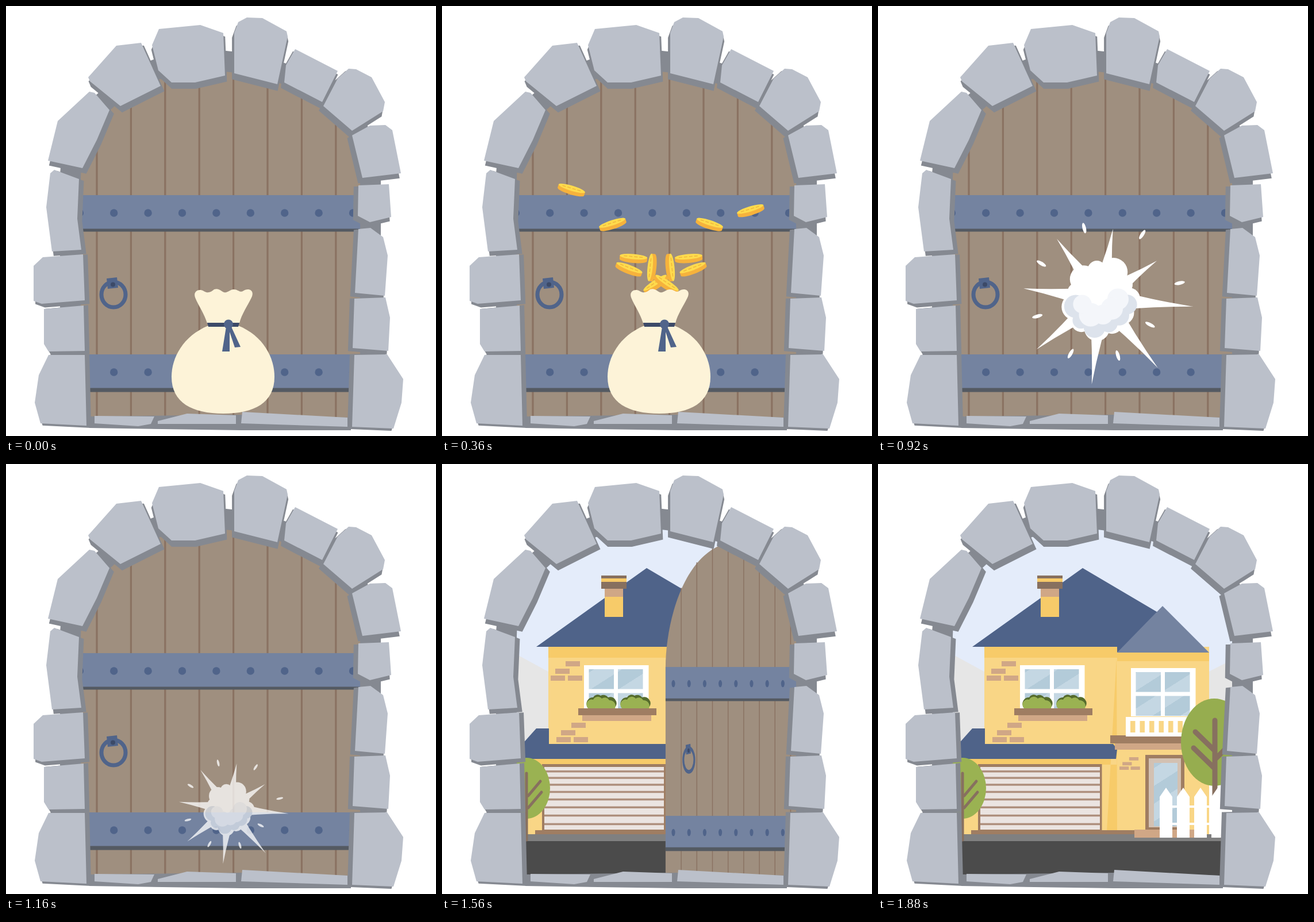
An HTML page that plays this animation: 748x748 px, repeating every 1.92 s.

```html
<!DOCTYPE html>
<html>
<head>
<meta charset="utf-8">
<style>
html, body { margin: 0; width: 100%; height: 100%; overflow: hidden; background: #fff; }
svg { display: block; width: 100vw; height: 100vh; }
</style>
</head>
<body>
<svg viewBox="0 0 748 748">
<defs>
  <path id="arch" d="M112 725V300C112 170 250 85 372 95S632 160 634 300V725"/>
  <clipPath id="gate"><use href="#arch"/></clipPath>
  <g id="stones">
    <path d="M74 607H137L140 730 60 726 50 690 57 642Z
      M66 527L135 521 137 600 74 601 66 588Z
      M48 452L64 437 134 432 137 512 62 518 48 513Z
      M77 291L84 285 127 301 124 370 131 424 80 427 70 350Z
      M73 269L90 200 145 149 154 151 180 181 158 233 133 282Z
      M606 509L660 507 668 542 665 600 603 595Z
      M606 607L663 606 691 649 688 690 674 735 602 732Z"/>
    <path d="M143 124L192 69 235 64 269 139 199 174 146 131Z
      M254 68L266 40 338 33 378 47 381 121 329 133H288L265 112Z
      M397 47L404 28 419 20 446 21 488 44 490 53 472 136 397 117Z
      M487 103L503 75 577 113 550 167 484 133Z
      M596 109L609 110 636 124 659 167 656 183 602 217 552 174 577 126Z
      M602 225L633 208 660 207 672 216 687 291 620 299Z
      M613 312L666 310 670 367 633 376 612 365Z
      M613 388L634 386 656 402 664 434 659 504 607 499Z"/>
  </g>
  <linearGradient id="glass" gradientUnits="userSpaceOnUse" x2="28" y2="44" spreadMethod="repeat">
    <stop offset=".5" stop-color="#b3cbd9"/><stop offset=".5" stop-color="#c4d7e3"/>
  </linearGradient>
  <path id="bricks" fill="#d0a786" d="M26 0h25v9h-25zM8 13h25v9h-25zM0 25h25v9h-25zM30 25h25v9h-25z"/>
  <g id="bush">
    <path d="M0 24A11 11 0 0 1 9 6A9 9 0 0 1 22 3A10 10 0 0 1 35 6A11 11 0 0 1 48 22Z" fill="#556b2c"/>
    <path d="M0 25A9 9 0 0 1 9 10A9 9 0 0 1 24 8A9 9 0 0 1 37 11A10 10 0 0 1 47 25Z" fill="#9ab252"/>
  </g>
  <g id="coin">
    <path d="M-24 -3v6a24 5 0 0 0 48 0v-6z" fill="#f6b23c"/>
    <ellipse cy="-3" rx="24" ry="4.5" fill="#ffdb4d"/>
    <path d="M-17 -3h34" stroke="#f0b93c" stroke-width="1.6" stroke-dasharray="6 3"/>
  </g>
</defs>

<g clip-path="url(#gate)">
  <g id="house">
    <path d="M100 80H640V520H100Z" fill="#e4ecfa"/>
    <path d="M100 315L190 364V520H100ZM646 325L570 364V520H646Z" fill="#e6e6e6"/>
    <path d="M185 318H576V645H148V513H185Z" fill="#f9d686"/>
    <path d="M185 318H416V328H576V343H416V337H185ZM148 513H416V523H148ZM415 337L398 640H416Z" fill="#f7cb69"/>
    <path d="M164 318L356 181 495 263 416 328V318ZM130 498L164 460H186V487H409L416 496 414 513H130Z" fill="#4f6389"/>
    <path d="M416 328L495 247 576 328Z" fill="#7483a0"/>
    <path d="M277 194H321V217H277Z" fill="#87705f"/>
    <path d="M277 199H321V205H277ZM283 231H315V266H283Z" fill="#f7cb69"/>
    <path d="M283 217H315V231H283ZM244 437H364V447H244ZM412 486H528V497H412Z" fill="#d0a786"/>
    <use href="#bricks" x="189" y="343"/>
    <use href="#bricks" x="199" y="450"/>
    <use href="#bricks" transform="translate(420 510)scale(.65)"/>
  </g>
  <g id="door"><path d="M98.600 780V330C98.600 250 165 105 366 95C568 105 633 250 633 330V780Z" fill="#9f8f7f"/></g>
</g>

<use href="#arch" fill="none" stroke="#858991" stroke-width="36"/>
<path d="M145 714L410 711 600 716V738H410L145 734Z" fill="#858991"/>
<use href="#stones" fill="#858991" stroke="#858991" stroke-width="7" transform="translate(372 602)scale(.98 .988)translate(-372 -600)"/>
<g fill="#bbc0ca">
  <use href="#stones"/>
  <path d="M154 713L258 714 252 727 230 731 154 726ZM264 722L315 709 400 712V727H264ZM411 706L594 716V732L409 726Z"/>
</g>

<g id="coins"></g>
<g id="bag">
  <path d="M352 556C308 574 288 612 288 645C288 690 324 709 378 709S467 690 467 645C467 612 448 574 404 556Z" fill="#fdf3d8"/>
  <path d="M350 552C345 535 334 520 329 507C325 496 336 491 344 496S357 497 362 493C370 490 374 496 379 498S390 493 396 493C404 493 406 499 412 496C420 490 432 493 428 505C422 519 410 535 406 552Z" fill="#fdf3d8"/>
  <path d="M350 551H406L404 558H352Z" fill="#3c4a68"/>
  <path d="M383 558L376 601H389V558ZM386 558L398 594 408 593 391 556Z" fill="#50648a"/>
  <circle cx="387" cy="553.500" r="8" fill="#50648a"/>
</g>
<g id="puff" fill="#fff"></g>
</svg>

<script>
const $ = id => document.getElementById(id);
const house = $('house'), door = $('door'), puff = $('puff'), bag = $('bag');
const add = (parent, tag, attrs) => {
  const el = document.createElementNS('http://www.w3.org/2000/svg', tag);
  for (const k in attrs) el.setAttribute(k, attrs[k]);
  parent.appendChild(el);
  return el;
};
const rect = (parent, x, y, width, height, fill) => add(parent, 'rect', { x, y, width, height, fill });
const circle = (parent, cx, cy, r, fill) => add(parent, 'circle', { cx, cy, r, fill });
const path = (parent, d, attrs) => add(parent, 'path', { d, ...attrs });
const clamp = (v, a = 0, b = 1) => Math.min(b, Math.max(a, v));

// Windows, sill, balcony and garage
const wood = '#9f7d62';
function pane4(x, y) {
  rect(house, x, y, 112.5, 84, '#fff');
  for (let i = 0; i < 4; i++)
    rect(house, x + 8.5 + i % 2 * 50.5, y + 7 + (i >> 1) * 41.5, 43.5, 34.5, 'url(#glass)');
}
pane4(247, 350);
pane4(440, 355);
for (const x of [254, 313]) add(house, 'use', { href: '#bush', x, y: 400 });
rect(house, 237, 425, 136, 12, wood);
rect(house, 404, 472, 136, 14, wood);
for (const y of [440, 467]) rect(house, 431, y, 119, 7, '#fff');
for (let x = 431; x < 548; x += 16.5) rect(house, x, 442, 8, 30, '#fff');

rect(house, 162, 637, 284, 8, wood);
rect(house, 174, 522, 215.5, 118, wood);
rect(house, 178, 527, 208, 109, '#ebe4e1');
for (let i = 0; i < 8; i++) rect(house, 178, 533 + 11 * i + .3 * i * i, 208, 3.5, '#ae8f7d');

// Front door and street
rect(house, 465, 506, 68, 134, wood);
rect(house, 471, 512, 56, 120, '#d3c1b2');
rect(house, 480, 520, 41, 110, 'url(#glass)');
rect(house, 100, 644, 540, 13, '#808080');
rect(house, 100, 656, 540, 80, '#4b4b4b');
rect(house, 446, 636, 104, 14, '#d0a786');

function tree(cx, cy, rx, ry, fill, width, branches) {
  add(house, 'ellipse', { cx, cy, rx, ry, fill });
  path(house, branches, { fill: 'none', stroke: '#87705f', 'stroke-linecap': 'round', 'stroke-width': width });
}
tree(585, 484, 58, 76, '#96ad4f', 9, 'M586 446V645M552 466L586 499M549 494L586 530M586 514L612 488');
tree(147, 564, 41, 53, '#9ab252', 5, 'M147 538V654M150 577L171 552M150 598L173 571');
for (const y of [594, 624]) rect(house, 490, y, 116, 4, '#fff');
for (let x = 490; x < 600; x += 30) path(house, `M${x} 650v-71l11 -16 11 16v71z`, { fill: '#fff' });

// Door planks, straps, studs and ring
const left = 98.6, plank = 59.4;
for (let i = 1; i < 9; i++) {
  const x = left + i * plank, off = (x - 366) / 268;
  rect(door, x - 1.6, 330 - 235 * Math.sqrt(1 - off * off), 3.2, 700, '#8a7262');
}
for (const [y, shade] of [[329, 5], [606, 7]]) {
  rect(door, left, y, 535, 59, '#7483a0');
  rect(door, left, y + 58.5, 535, shade, '#545a62');
  for (let i = .5; i < 9; i++) circle(door, left + i * plank, y + 31, 6.7, '#50648a');
}
add(door, 'ellipse', { cx: 187, cy: 502, rx: 21, ry: 22, fill: 'none', stroke: '#50648a', 'stroke-width': 7 });
path(door, 'M175 474L193 472 195 490 177 492Z', { fill: '#50648a' });
circle(door, 186, 484.5, 4, '#3c4a68');

// Mirrored coin pairs in two waves; each coin accelerates into the bag.
// Pair: offset from the mouth at 360 ms, tilt, how much lower the right coin is.
const mouth = { x: 381, y: 512 }, flight = 250, coins = [];
const pairs = [[156, -192, 17, 36], [84, -132, -18, 0], [48, -73, 5, 0], [56, -54, 21, 0], [16, -57, -84, 0], [9, -28, -34, 0]];
for (const wave of [0, 200])
  for (const [x, y, tilt, drop] of pairs)
    for (const side of [-1, 1]) {
      const dx = side * x, dy = side > 0 ? y + drop : y;
      const reach = clamp(255 / Math.hypot(dx, dy), 1.05, 3.5);
      const start = 360 - wave - flight * Math.sqrt(1 - 1 / reach);
      coins.push({ dx, dy, side, tilt: -side * tilt, reach, start, el: add($('coins'), 'use', { href: '#coin' }) });
    }

// Burst: spikes, drops and cloud lobes set around a circle
const polar = (turn, r) => [r * Math.cos(turn), r * Math.sin(turn)];
for (let i = 0; i < 8; i++) {
  const turn = .08 + i * .8, long = 104 - 4 * i;
  const deg = turn * 180 / Math.PI;
  path(puff, `M0 -14Q${long * .5} -4 ${long} 0Q${long * .5} 4 0 14Z`, { transform: `rotate(${deg})` });
  const [x, y] = polar(turn + .4, 62 + i * 4);
  add(puff, 'ellipse', { rx: 6, ry: 2, transform: `translate(${x} ${y})rotate(${deg + 23})` });
}
function lobes(count, ring, size, from, to, fill) {
  for (let i = 0; i < count; i++) {
    const [x, y] = polar(from + (to - from) * i / count, ring + 3 * Math.sin(i * 5));
    circle(puff, x, y, size + 3 * Math.sin(i * 3), fill);
  }
}
circle(puff, 0, 0, 35);
lobes(11, 31, 13, 0, 2 * Math.PI);
lobes(6, 30, 11, .2, 3.4, '#dde3ec');
lobes(5, 19, 12, 0, 3.6, '#f4f6fa');

const show = (el, on) => el.setAttribute('display', on ? 'inline' : 'none');
const move = (el, x, y, rest) => el.setAttribute('transform', `translate(${x} ${y})${rest}`);
const zoom = (el, x, y, sx, sy) => move(el, x, y, `scale(${sx} ${sy})translate(${-x} ${-y})`);

function draw(t) {
  for (const c of coins) {
    const u = (t - c.start) / flight, far = c.reach * (1 - u * u);
    show(c.el, t >= 40 && u >= 0 && u < 1);
    move(c.el, mouth.x + c.dx * far, mouth.y + c.dy * far, `rotate(${c.tilt + (t - 360) * .05 * c.side})`);
  }

  const swell = Math.min(1.27, 1 + .094 * (Math.max(0, t - 500) / 180) ** 1.4);
  show(bag, t < 920);
  zoom(bag, 378, 600.5, swell, swell);

  const fade = clamp((t - 960) / 200);
  show(puff, t >= 880 && t < 1200);
  move(puff, 388, 510 + 90 * fade, `scale(${.9 + 1.3 * clamp((t - 880) / 80) - 1.2 * fade})`);
  puff.setAttribute('opacity', 1 - .25 * fade);

  const open = clamp((t - 1226) / 616);
  show(door, open < 1);
  zoom(door, 634, 699, 1 - open, 1 - .14 * open ** 1.25);
}

const begin = performance.now();
function tick() {
  const t = (performance.now() - begin) % 1920;
  draw(Math.floor(t / 40) * 40);
  requestAnimationFrame(tick);
}
tick();
</script>
</body>
</html>
```
